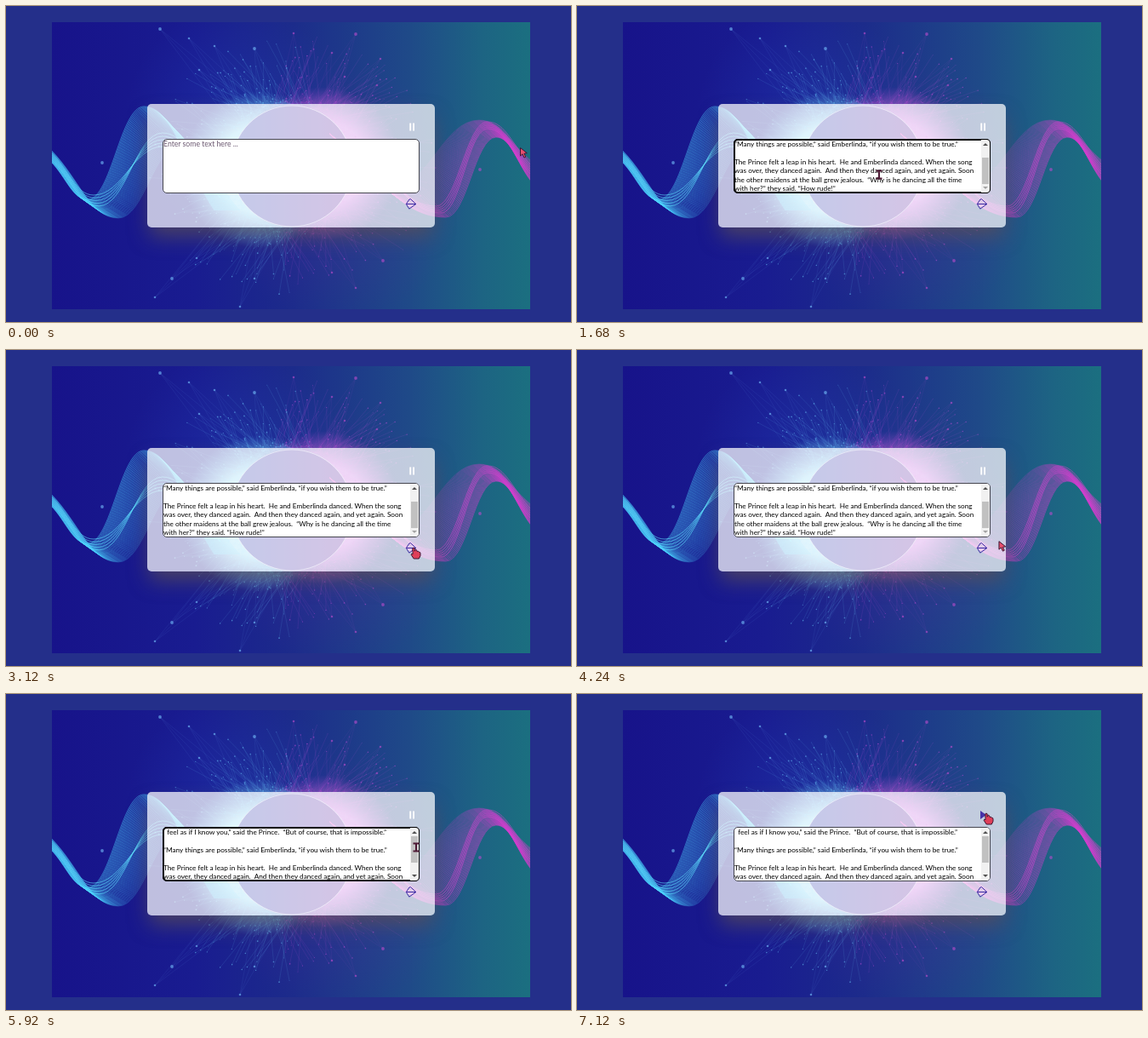
An HTML page with a canvas for the animation above (8000 ms loop, 664 by 371 pixels).

```html
<!DOCTYPE html>
<html lang="en">
<head>
<meta charset="utf-8">
<title>Read aloud box</title>
<style>
html, body { margin: 0; width: 100%; height: 100%; overflow: hidden; background: #242f8a; }
canvas, svg, div { position: absolute; box-sizing: border-box; }
canvas, svg { left: 0; top: 0; }
#panel { left: 166px; top: 115px; width: 338px; height: 145px; border-radius: 5px;
  background: rgba(255,255,255,.72); box-shadow: 0 13px 24px -3px rgba(92,80,86,.75); }
#box { left: 184px; top: 156px; width: 302px; height: 64px; border: 1px solid #45454f;
  border-radius: 5px; background: #fff; overflow: hidden; }
#box.focus { border-color: #000; outline: 2px solid #000; outline-offset: -2px; }
#hint, #story { left: 0; top: 0; white-space: pre; color: #000;
  font: 8.22px/10.4px Lato, "Open Sans", sans-serif; }
#hint { color: #6d5a72; font-size: 8.7px; }
#caret { left: 1px; top: 1px; width: 1px; height: 9px; background: #000; }
#bar { right: 0; top: 0; width: 10px; height: 62px; background: #f1f1f1; }
#thumb { left: 1px; width: 8px; height: 31px; }
.up, .down { left: 2px; border: 3px solid transparent; }
.up { top: 1px; border-bottom-color: #505050; }
.down { bottom: 1px; border-top-color: #505050; }
</style>
</head>
<body>
<canvas id="bg" width="664" height="371"></canvas>
<div id="panel"></div>
<div id="box">
  <div id="hint">Enter some text here ...</div>
  <div id="caret"></div>
  <div id="story">  feel as if I know you,” said the Prince.  “But of course, that is impossible.”

“Many things are possible,” said Emberlinda, “if you wish them to be true.”

The Prince felt a leap in his heart.  He and Emberlinda danced. When the song
was over, they danced again.  And then they danced again, and yet again. Soon
the other maidens at the ball grew jealous.  “Why is he dancing all the time
with her?” they said. “How rude!”</div>
  <div id="bar"><div class="up"></div><div id="thumb"></div><div class="down"></div></div>
</div>
<svg width="664" height="371">
  <path id="pause" d="M474.3 137.5h1.9v9h-1.9zM478.1 137.5h1.9v9h-1.9z" fill="#fff"/>
  <path id="play" d="M474 137l7 5-7 5z" fill="#4632a8"/>
  <path d="M470.3 232.5L474 227l1.5-.3 6.3 5.8-8 5.7zM470.3 232.5H481.8" fill="none" stroke="#3b2aa3" stroke-linejoin="round"/>
  <g id="arrow"><path d="M.5 .5V10L3 7.8 5 12 6.8 11.1 4.9 7.2 8.3 6.7Z" fill="#e8506e" stroke="#3b1734"/></g>
  <g id="beam"><path d="M-3.5-4.5H3.5M-3.5 4.5H3.5M0-4.5V4.5" fill="none" stroke="#4e1a35" stroke-width="2"/></g>
  <g id="hand"><path d="M-1.2 .8Q0-.8 1.2 .8V4.2Q3-.1 4.2 4.6 6 3.6 6.5 5.4 8 5 8 6.8V9.5L6.3 13H.2L-2.8 8.4Q-2.8 6.4-.9 7.6Z" fill="#df3f59" stroke="#3b1734"/></g>
</svg>
<script>
const $ = id => document.getElementById(id);
const c = $("bg").getContext("2d");
let seed = 7;
const rnd = () => (seed = seed * 16807 % 2147483647) / 2147483647;

function fillRect(grad, stops) {
  stops.forEach(([p, col]) => grad.addColorStop(p, col));
  c.fillStyle = grad;
  c.fillRect(54, 19, 562, 337);
}
const glow = (x, y, r, stops) => fillRect(c.createRadialGradient(x, y, 0, x, y, r), stops);
function dot(x, y, r) {
  c.beginPath();
  c.arc(x, y, r, 0, 7);
  c.fill();
}
function line(x0, y0, x1, y1) {
  c.beginPath();
  c.moveTo(x0, y0);
  c.lineTo(x1, y1);
  c.stroke();
}
// smooth curve, level at its inner points and sloping at both ends
function strand(color, points) {
  const last = points.length - 1;
  c.strokeStyle = color;
  c.beginPath();
  points.forEach(([x, y], i) => {
    if (!i) return c.moveTo(x, y);
    const [px, py] = points[i - 1], m = (x - px) * .42, slope = (y - py) / (x - px) * m;
    c.bezierCurveTo(px + m, py + (i == 1 ? slope : 0), x - m, y - (i == last ? slope : 0), x, y);
  });
  c.stroke();
}

function backdrop() {
  c.beginPath();
  c.rect(54, 19, 562, 337);
  c.clip();
  fillRect(c.createLinearGradient(54, 0, 616, 0),
    [[0, "#17138a"], [.3, "#191c90"], [.5, "#1c2b8b"], [.75, "#1f4a88"], [.9, "#1d6483"], [1, "#1b6f80"]]);
  glow(270, 130, 130, [[0, "rgba(40,80,210,.25)"], [1, "rgba(40,80,210,0)"]]);
  glow(390, 220, 150, [[0, "rgba(110,40,165,.25)"], [1, "rgba(110,40,165,0)"]]);
  glow(298, 192, 92, [[0, "#b4f4ff"], [.55, "rgba(160,238,255,.9)"], [1, "rgba(90,190,255,0)"]]);
  glow(374, 185, 90, [[0, "#e896fa"], [.55, "rgba(226,125,245,.85)"], [1, "rgba(200,80,220,0)"]]);

  c.lineWidth = .5;
  for (let i = 0; i < 750; i++) {
    const a = rnd() * Math.PI * 2, b = a + (rnd() - .5) * .7, r = 76 + 80 * rnd() ** 2.6;
    const x = 336 + Math.cos(b) * r * 1.1, y = 188 + Math.sin(b) * r;
    const rgb = x < 336 + (rnd() - .5) * 40 ? "110,205,255" : "195,80,220";
    c.strokeStyle = `rgba(${rgb},.22)`;
    line(336 + Math.cos(a) * 72, 188 + Math.sin(a) * 72, x, y);
    c.fillStyle = `rgba(${rgb},.5)`;
    dot(x, y, .3 + rnd() * .6);
  }
  // far nodes and their threads
  [[181, 27], [227, 75], [245, 47], [113, 184], [175, 342], [224, 296], [292, 50], [275, 353], [292, 320],
   [195, 320], [215, 38], [338, 32], [411, 33], [383, 55], [440, 62], [443, 299], [411, 331], [383, 313],
   [557, 192], [436, 93], [398, 83]].forEach(([x, y], i) => {
    const rgb = x < 336 ? "110,180,245" : "175,75,200";
    c.strokeStyle = `rgba(${rgb},.16)`;
    if (x > 150 && x < 500) for (let k = -1; k < 2; k++) {
      const a = Math.atan2(y - 188, x - 336) + k * .25;
      line(x, y, 336 + Math.cos(a) * 74, 188 + Math.sin(a) * 74);
    }
    c.fillStyle = `rgba(${rgb},.65)`;
    dot(x, y, i % 3 ? 1.3 : 1.9);
  });

  const disc = c.createLinearGradient(265, 0, 407, 0);
  disc.addColorStop(0, "#2b42b4");
  disc.addColorStop(1, "#6a2ba4");
  c.fillStyle = disc;
  dot(336, 188, 71);
  c.strokeStyle = "rgba(235,235,255,.6)";
  c.lineWidth = 1;
  c.stroke();

  // two ribbons of shifted strands
  c.lineWidth = .8;
  for (let k = 0; k <= 1; k += 1 / 44) {
    strand(`rgba(75,205,250,${.6 - .3 * k})`,
      [[53, 183 - 14 * k], [96 + 36 * k, 227 + 22 * k], [162 + 42 * k, 118 + 46 * k], [245 + 30 * k, 240]]);
    strand(`rgba(208,62,205,${.3 + .3 * k})`,
      [[380, 150], [455 + 62 * k, 212 + 36 * k], [556 + 20 * k, 134 + 20 * k], [618, 182 + 25 * k]]);
  }
  for (let k = 0; k < 1; k += .2) {
    strand("rgba(95,225,255,.75)",
      [[53, 172 + 10 * k], [103 + 8 * k, 222 + 16 * k], [184, 165 - 20 * k], [252, 225]]);
    strand("rgba(215,70,210,.7)",
      [[425, 180], [505 + 8 * k, 235 + 10 * k], [566, 136 + 10 * k], [618, 188 + 14 * k]]);
  }
}

// pointer hotspot: time, x, y
const path = [[0, 604, 166], [400, 355, 198], [1840, 355, 198], [2200, 386, 202], [2680, 440, 214],
  [2760, 440, 214], [3120, 479, 232], [3960, 479, 232], [4360, 500, 222], [4760, 500, 222],
  [5080, 478, 198], [5240, 478, 191], [5600, 482, 180], [5920, 482, 180], [6440, 481, 140]];
function pointer(t) {
  const i = path.findIndex(p => p[0] > t);
  if (i < 0) return path[path.length - 1].slice(1);
  const [t0, x0, y0] = path[i - 1], [t1, x1, y1] = path[i];
  const u = (t - t0) / (t1 - t0), e = u * u * (3 - 2 * u);
  return [x0 + (x1 - x0) * e, y0 + (y1 - y0) * e];
}
const show = (id, on) => $(id).style.display = on ? "" : "none";
const within = (v, a, b) => v >= a && v < b;

function draw(now) {
  const t = Math.floor(now % 8000 / 40) * 40;
  const [x, y] = pointer(t);
  const inBox = within(y, 156, 220) && within(x, 184, 486);
  const onIcon = within(x, 469, 484) && (within(y, 135, 149) || within(y, 226, 240));
  const kind = onIcon ? "hand" : inBox && (x < 475 || t >= 5640) ? "beam" : "arrow";
  for (const id of ["arrow", "beam", "hand"]) show(id, id == kind);
  $(kind).setAttribute("transform", `translate(${x} ${y})`);

  const filled = t >= 1600, dragging = within(t, 5240, 5640);
  show("hint", !filled);
  show("caret", within(t, 1040, 1320));
  show("story", filled);
  show("bar", filled);
  $("box").className = within(t, 1040, 3120) || within(t, 5240, 6640) ? "focus" : "";

  const scroll = t < 5240 ? 1 : t < 5600 ? (y - 180) / 11 : 0;
  $("story").style.top = -20.8 * scroll + "px";
  $("thumb").style.top = 10 + 11 * scroll + "px";
  const hover = inBox && kind == "arrow";
  $("thumb").style.background = dragging ? "#787878" : hover ? "#a8a8a8" : "#c1c1c1";
  document.querySelector(".down").style.borderTopColor = scroll == 1 ? "#a3a3a3" : "#505050";

  show("pause", t < 6640);
  show("play", t >= 6640);
}

backdrop();
const start = performance.now();
function loop() {
  draw(performance.now() - start);
  requestAnimationFrame(loop);
}
loop();
</script>
</body>
</html>
```
